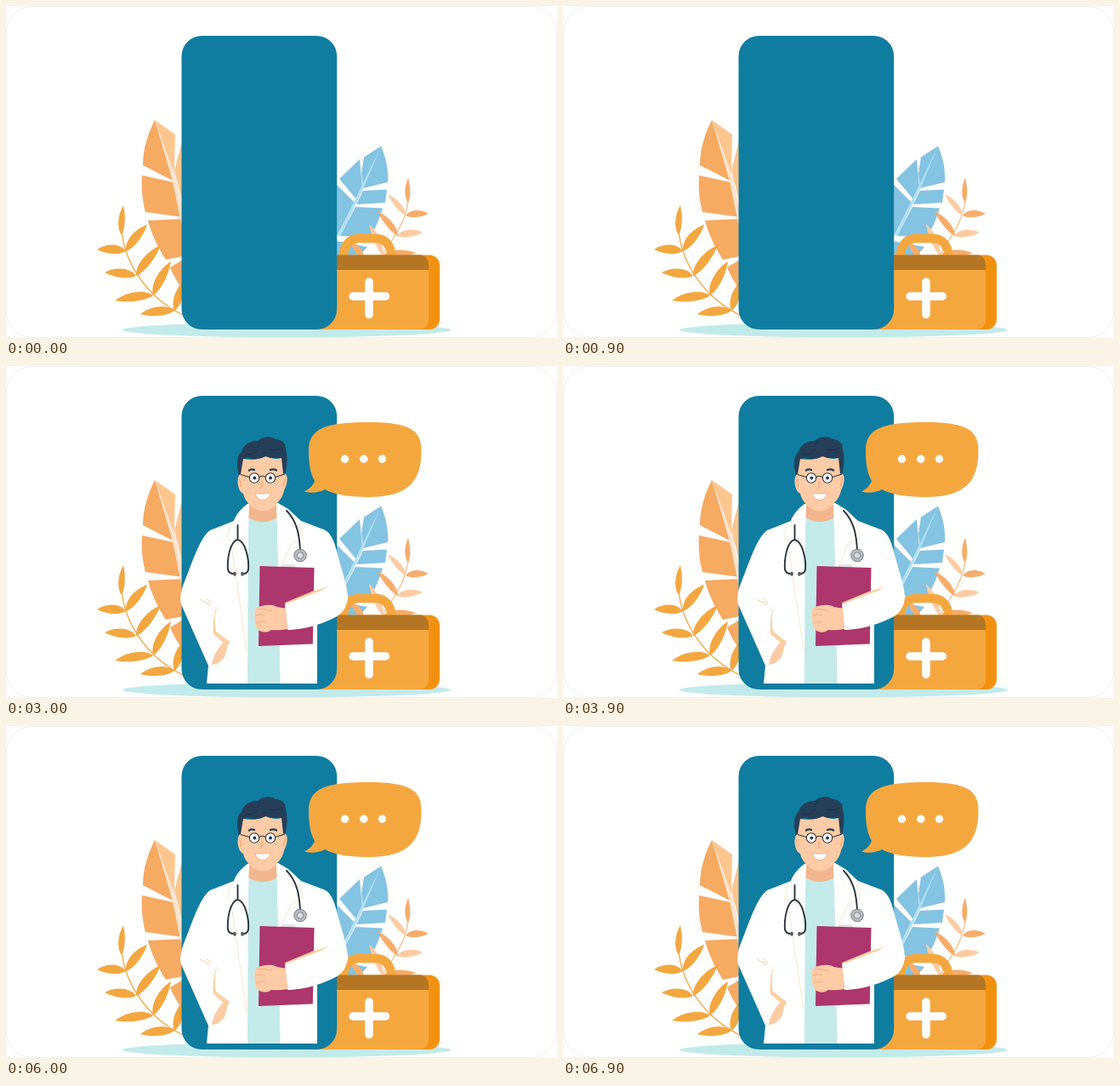
Animation, 648 px wide and 390 px high, one loop 7500 ms. Source, as an HTML page:

```html
<!DOCTYPE html>
<html lang="en">
<head>
<meta charset="utf-8">
<title>Doctor on call</title>
<style>
html, body { margin: 0; width: 100%; height: 100%; overflow: hidden; background: #fff; }
svg { display: block; width: 648px; height: 390px; }
</style>
</head>
<body>
<svg viewBox="0 0 648 390">
  <rect x=".5" y=".5" width="647" height="389" rx="30" fill="#fff" stroke="#efefef"/>
  <ellipse cx="330" cy="380.500" rx="193" ry="8.800" fill="#c3eaea"/>

  <g id="bigLeaf" fill="#f6aa62">
    <path fill="#fdc68f" d="M175 134L199 151L198 190L197 205ZM208 155L198 193L208 232Z"/>
    <path d="M175 134C168 147 161 167 161 187L198 206ZM160 199L197 207L208 248L164 242C160 228 159 212 160 199ZM167 252L208 250V294L188 298C179 284 171 268 167 252ZM193 307L208 298V333Q198 320 193 307Z"/>
    <path d="M175 134L199 199L212 255H206L196 206Z" fill="#fee3cc"/>
  </g>

  <g id="leftSprig" fill="#f3a740" stroke="#f3a740">
    <path d="M136 262C138 295 160 340 210 364" fill="none" stroke-width="1.300"/>
  </g>

  <g id="blueLeaf" fill="#84c3e2">
    <path d="M441 164.500L421 177.500L418 197L420 214ZM441 164.500C447 178 450 193 449 207L420 214ZM416 180L392 203L412 227L419 213ZM448 215.500L420 217L412 233L446 231ZM443 237.500L411 236L393 270L428 272Q438 255 443 237.500ZM388 209L410 231L388 272ZM425 283L388 276V300L412 298Z"/>
    <path d="M441 165L420 215L393 271L390 269L417 214Z" fill="#b0e1f6"/>
  </g>

  <g id="rightSprig">
    <path d="M473 226C472 250 458 270 440 296" fill="none" stroke="#f8b982" stroke-width="1.200"/>
  </g>

  <g id="bag">
    <path d="M396.500 296C397 281 404 273 415 273H435C446 273 453 281 454 296" fill="none" stroke="#f5a73f" stroke-width="10.500"/>
    <rect x="360" y="292.500" width="150" height="87.500" rx="12" fill="#f29111"/>
    <path d="M366 292.500H487Q497 293 497 305V367Q497 380 485 380H366Z" fill="#f5a73f"/>
    <path d="M366 292.500H487Q497 293 497 305V310H366Z" fill="#b47625"/>
    <path d="M427 324V362.500M408 341H446.500" stroke="#fff" stroke-width="9.500" stroke-linecap="round"/>
  </g>

  <rect x="206.500" y="35" width="182.700" height="345" rx="24" fill="#0f7da0"/>

  <g id="doctor">
    <path fill="#fff" d="M284 162C277 167 270 175 268 182L240 193C230 200 222 222 214 243C208 258 203 269 206 280L238 352L236 373H366V303C386 297 402 288 402 271C401 255 393 235 388 214C384 199 378 193 372 191.500L347 182L332 168L320 161Z"/>
    <path fill="#c3eae9" d="M285 176L284 373H322.500L319 176Z"/>
    <path fill="#fdcba5" d="M287 153H318L319 178Q302 188 285 178Z"/>
    <path fill="#f1b68d" d="M286 163Q302 178 318 163L319 178Q302 188 285 178V170Z"/>
    <path fill="#fff" d="M286 161Q272 170 268 184L276 208L284 225ZM318 161L345 184L331 204L320 222Z"/>
    <path fill="none" stroke="#fbe5cd" d="M264 187L260 203L270 210M266 217L283 335M345 184L349 202L336 208L323 237"/>

    <path fill="#fdcba5" d="M255 325L261 327L257 342Q250 351 242 351Q243 342 249 333Z"/>
    <path fill="#fbcf9f" d="M249 280C245 292 245 304 247 312L263 324L250 348L257 326L244 315C243 303 244 291 249 280Z"/>
    <path fill="none" stroke="#f8cda2" d="M228 274L240 281M236 273L241 279"/>

    <path fill="#263f59" d="M274 129C271 116 271 105 277 101C278 93 288 87 296 88C301 82 313 82 317 86C324 86 330 91 329 99C332 108 330 121 328 129H324L322 108H282L279 129Z"/>
    <path fill="#fdcba5" d="M279 109Q294 112 305 106Q316 111 324 108L326 127C332 124 332 138 327 146C325 159 312 169 302 169C291 169 281 160 279 150C271 146 271 128 276 127Z"/>
    <path fill="#263f59" d="M278 106Q292 113 308 105Q319 109 327 106L325 97L282 97Z"/>
    <path fill="none" stroke="#1c334b" d="M281 103Q290 106 297 98M300 88Q295 91 296 95M310 98Q320 100 325 96"/>
    <path fill="none" stroke="#263f59" stroke-width="2.400" stroke-linecap="round" d="M286 122.500Q289 120.500 292 122M311 122Q315 120.500 318 122.500"/>
    <g fill="#fff" stroke="#34393d" stroke-width="1.100">
      <path fill="none" d="M276 127.500L286 130.500M298 130.500Q301.500 128 305 130.500M317 130.500L328 127"/>
      <circle cx="292" cy="131.500" r="5.700"/>
      <circle cx="311" cy="131.500" r="5.700"/>
    </g>
    <g fill="#263646"><circle cx="292.300" cy="131.500" r="1.900"/><circle cx="311" cy="131.500" r="1.900"/></g>
    <path fill="none" stroke="#efa577" stroke-width="1.200" d="M301 135Q302 142 299 144M274 133Q277 137 276 142M329 132Q326 137 327 142"/>
    <path fill="#fff" stroke="#eda779" stroke-width=".8" d="M293 149.500Q302 151 311 149Q309 157.500 302 157.500Q295 157 293 149.500Z"/>

    <g fill="none" stroke="#2c343c" stroke-width="1.900" stroke-linecap="round">
      <path d="M272.500 187V204M272.500 204C263 206 260 228 261 239Q262 244 268 244M272.500 204C282 206 286 228 285 239Q284 244 279 244M330 170C343 183 345 200 346 216"/>
      <path stroke="#555b61" stroke-width="3.500" d="M269 243.500V245M278 243.500V245"/>
    </g>
    <circle cx="346" cy="222.500" r="7.300" fill="#b9bdc0" stroke="#777d82"/>
    <circle cx="346" cy="222.500" r="3.800" fill="#dadddf" stroke="#83898d"/>

    <path fill="#dfe3e4" d="M323 236L325 233H339L342 237Z"/>
    <path fill="#ad366c" d="M298.500 235L362.500 237L360.800 326.500L297 329Z"/>
    <path fill="#fff" d="M328 279L364 265L380 256L399 258C403 273 402 285 391 293C378 301 352 310 331 310Z"/>
    <path fill="#fbcf9f" d="M328 278L362 264Q374 262 379 257Q374 264 362 267L328 280Z"/>
    <path fill="#fdcba5" d="M329 284Q321 285 314 281Q301 280 294 285Q291 289 293 293Q291 298 294 302Q293 308 298 311Q306 315 312 310Q321 311 331 309Z"/>
    <path fill="none" stroke="#f0b086" d="M295 286Q304 284 313 288M293 293Q300 291 305 293M294 302Q300 299 305 301"/>
  </g>

  <g id="bubble">
    <path fill="#f5a73f" d="M356 99C356 75 373 66 426 66C476 66 488.500 76 488.500 99C488.500 133 476 154 426 154C401 154 384 150 375 145Q363 151 351 147.500Q361 142 363 135C357 125 356 111 356 99Z"/>
    <g fill="#fff"><circle cx="398.500" cy="109.300" r="4.700"/><circle cx="420.800" cy="109.300" r="4.700"/><circle cx="442.500" cy="109.300" r="4.700"/></g>
  </g>
</svg>
<script>
const $ = id => document.getElementById(id);

// Each leaf: base x, base y, tip x, tip y, bulge (its sign picks the fuller side), optional fill
function addLeaves(parent, leaves) {
  for (const [x, y, tx, ty, w, fill] of leaves) {
    const leaf = document.createElementNS("http://www.w3.org/2000/svg", "path");
    const dx = tx - x, dy = ty - y, len = Math.hypot(dx, dy);
    const at = (along, side) => `${x + dx * along - dy / len * side} ${y + dy * along + dx / len * side}`;
    const full = w * 1.25, flat = -w * .75;
    leaf.setAttribute("d", `M${x} ${y}C${at(.2, full)} ${at(.65, full)} ${tx} ${ty}C${at(.65, flat)} ${at(.2, flat)} ${x} ${y}Z`);
    leaf.setAttribute("stroke", "none");
    if (fill) leaf.setAttribute("fill", fill);
    parent.append(leaf);
  }
}

addLeaves($("leftSprig"), [
  [136, 269, 138, 234, -5], [141, 288, 107, 286, 7], [141, 288, 166, 257, -7],
  [153, 317, 116, 313, 7], [153, 317, 182, 281, -7], [173, 340, 128, 346, 7],
  [173, 340, 194, 300, -7], [198, 358, 158, 362, 7], [198, 358, 214, 318, -7]
]);

const dark = "#f7ad6b", pale = "#fdcca4";
addLeaves($("rightSprig"), [
  [473, 231, 473, 202, -4, dark], [470, 246, 497, 244, -5.5, dark],
  [470, 246, 449, 221, 4.5, pale], [460, 270, 490, 266, -5.5, pale],
  [461, 270, 437, 241, 5, dark], [442, 294, 482, 290, -6, dark],
  [443, 293, 427, 256, 5, pale], [420, 296, 405, 277, 5, dark]
]);

// Stepped states, one every 1500 ms
const stepMs = 1500;
const states = [
  { doctor: 0, bubble: 0, lift: 0 },
  { doctor: 1, bubble: 0, lift: 0 },
  { doctor: 1, bubble: 1, lift: 0 },
  { doctor: 1, bubble: 1, lift: -10 },
  { doctor: 1, bubble: 1, lift: 0 }
];

function draw(time) {
  const s = states[Math.floor(time / stepMs) % states.length];
  $("doctor").style.opacity = s.doctor;
  $("bubble").style.opacity = s.bubble;
  $("bubble").setAttribute("transform", `translate(0 ${s.lift})`);
}

const start = performance.now();
function tick() {
  draw(performance.now() - start);
  requestAnimationFrame(tick);
}
tick();
</script>
</body>
</html>
```
